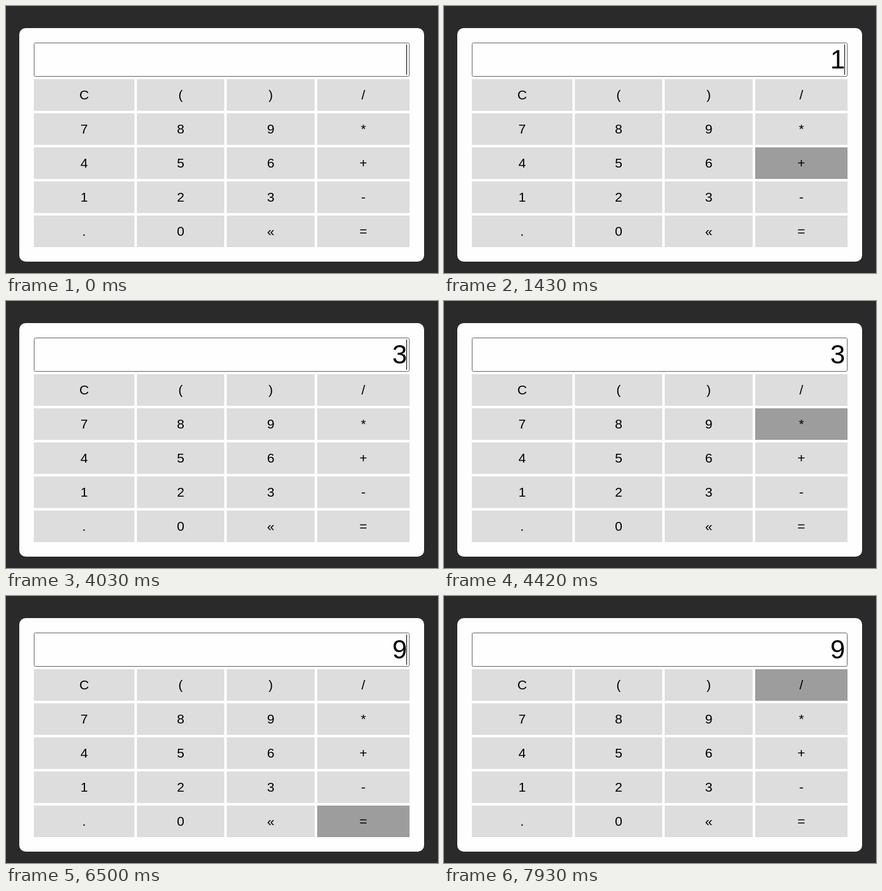
These frames come from a looping animation (683x423 px, 8 s). An HTML page:

```html
<!DOCTYPE html>
<html lang="en">
<head>
<meta charset="utf-8">
<title>Calculator</title>
<style>
  html, body { margin: 0; width: 100%; height: 100%; overflow: hidden; background: #2a2a2a; }
  svg { display: block; width: 683px; height: 423px; font-family: "Liberation Sans", Arial, sans-serif; }
  .key rect { fill: #ddd; }
  .key.hover rect { fill: #9d9d9d; }
  .key text { font-size: 21px; text-anchor: middle; }
  #value { font-size: 42px; text-anchor: end; }
</style>
</head>
<body>
<svg viewBox="0 0 683 423">
  <rect x="21" y="35" width="640" height="370" rx="10" fill="#fefefe"/>
  <rect x="44.5" y="58.5" width="593" height="53" rx="2" fill="#fefefe" stroke="#666"/>
  <text id="value" x="634" y="99"></text>
  <rect id="caret" x="633" y="61" width="1" height="48"/>
  <g id="keys"></g>
</svg>
<script>
const LOOP = 8000;
const rows = ["C()/", "789*", "456+", "123-", ".0«="];
const columns = [[44, 159], [207, 138], [349, 139], [492, 146]];

// Each track lists [start time, state]; a state holds until the next entry.
const hoverTrack = [
  [0, ""], [780, "1"], [1300, "2"], [1430, "+"], [1950, "3"], [2080, "2"],
  [2730, "="], [4030, ""], [4160, "-"], [4290, "+"], [4420, "*"],
  [5590, "3"], [5850, "="], [7020, "-"], [7150, "+"], [7280, "*"], [7800, "/"]
];
const valueTrack = [
  [0, ""], [1170, "1"], [1820, "1+"], [2470, "1+2"], [3380, "3"],
  [5070, "3*"], [5720, "3*3"], [6500, "9"]
];
const caretToggles = [650, 1170, 1820, 2340, 2990, 3640, 4290, 4940, 5590, 6370, 6890, 7540, 7930];

const byId = id => document.getElementById(id);
const value = byId("value"), caret = byId("caret");
const keys = {};

function add(parent, tag, attributes) {
  const node = document.createElementNS("http://www.w3.org/2000/svg", tag);
  for (const name in attributes) node.setAttribute(name, attributes[name]);
  return parent.appendChild(node);
}

rows.forEach((row, r) => [...row].forEach((label, c) => {
  const [x, width] = columns[c];
  const y = 116 + 54 * r;
  const key = keys[label] = add(byId("keys"), "g", { class: "key" });
  add(key, "rect", { x, y, width, height: 50 });
  add(key, "text", { x: x + width / 2, y: y + 32 }).textContent = label;
}));

const stateAt = (track, time) => track.filter(([start]) => start <= time).pop()[1];

function draw() {
  const time = performance.now() % LOOP;
  const hovered = stateAt(hoverTrack, time);
  for (const label in keys) keys[label].classList.toggle("hover", label === hovered);
  value.textContent = stateAt(valueTrack, time);
  const toggles = caretToggles.filter(start => start <= time).length;
  caret.setAttribute("visibility", toggles % 2 ? "hidden" : "visible");
  requestAnimationFrame(draw);
}
draw();
</script>
</body>
</html>
```
